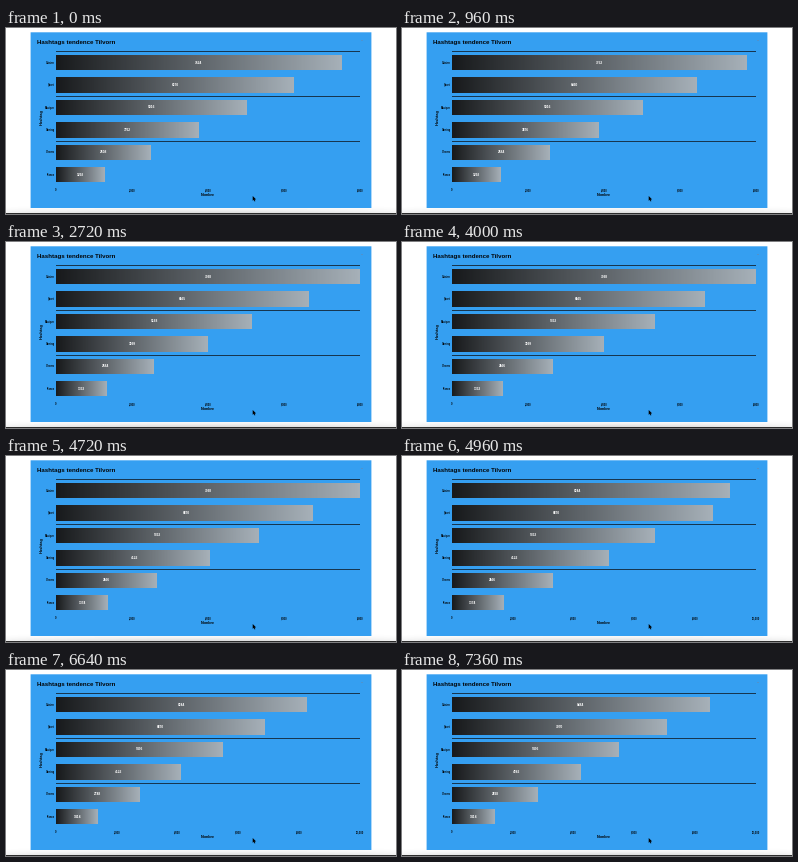
Write a matplotlib script that moves like this. It is 390 by 186 pixels and loops after 8000 ms.

```python
import numpy as np
import matplotlib.pyplot as plt
from matplotlib.animation import FuncAnimation
from matplotlib.colors import LinearSegmentedColormap
from matplotlib.patches import Polygon, Rectangle

W, H, DPI = 390, 186, 100
STEP, FRAMES = 80, 100
LEFT, SPAN = 50, 304
TOP, PITCH, BAR_H = 23.5, 22.4, 15.5
BLUE, INK = "#359ff1", "#020508"
RESCALE = 62

TAGS = ["Cuisine", "Sport", "Musique", "Gaming", "Cinema", "France"]
WEIGHTS = [6, 5, 4, 3, 2, 1]
COUNTS = [1254, 1292, 1333, 1374, 1414]

# Frames at which each count is raised, and at which its bar follows.
RAISE = [(3, 32, 62, 90), (1, 31, 59, 87), (16, 46, 75),
         (1, 31, 59, 87), (5, 35, 64, 91), (25, 54, 83)]
GROW = list(RAISE)
GROW[1] = (5, 31, 59, 89)
GROW[3] = (3, 31, 59, 89)
FIRST = [0, 0, 0, 0, 0, 1]

fig = plt.figure(figsize=(W / DPI, H / DPI), dpi=DPI, facecolor="white")
ax = fig.add_axes([0, 0, 1, 1])
ax.axis("off")


def px(size):
    return size * 72 / DPI


def write(x, y, text, size, color=INK, ha="center", bold=True, **kw):
    return ax.text(x, y, text, fontsize=px(size), color=color, ha=ha,
                   va="center", family="Liberation Sans",
                   weight="bold" if bold else "normal", zorder=5, **kw)


def box(x, y, w, h, color, snap=True):
    ax.add_patch(Rectangle((x, y), w, h, fc=color, ec="none", snap=snap))


def middle(row):
    return TOP + (row + 0.5) * PITCH


def value(schedule, bar, frame):
    done = sum(frame >= f for f in schedule[bar])
    return WEIGHTS[bar] * COUNTS[FIRST[bar] + done]


def axis_max(frame):
    return 10000 if frame >= RESCALE else 8000


def bar_end(bar, frame):
    shown = (value(GROW, bar, frame) + value(GROW, bar, frame - 1)) / 2
    now, before = SPAN / axis_max(frame), SPAN / axis_max(frame - 1)
    # The leading bar is halfway through the new scale while the rest wait.
    scale = (now + before) / 2 if bar == 0 else before
    return round(LEFT + shown * scale)


# Page shadow, window edge and panel
across = np.sin(np.linspace(0.15, np.pi - 0.15, W)) ** 0.5
down = np.linspace(0, 1, 9)[:, None] ** 2
ax.imshow(1 - 0.13 * down * across, cmap="gray", vmin=0, vmax=1,
          extent=(0, W, 185, 176), aspect="auto", zorder=0)
box(0, 185, W, 1, "#2c2c2c")
box(24.6, 4.3, 340.8, 175.7, BLUE, snap=False)

write(31, 14.4, "Hashtags tendence Tilvorn", 6.13, ha="left")
write(35.7, 89, "Hashtag", 4, rotation=90)
write(201.5, 167, "Nombre", 3.8)
box(355, 12, 2, 1, "#4e93cf")

for row in (0, 2, 4):
    box(LEFT, int(TOP + row * PITCH), SPAN, 1, "#17364f")

# Bars
shade = LinearSegmentedColormap.from_list("shade", ["#181a1c", "#a6b0b8"])
ramp = np.linspace(0, 1, 256)[None, :]
bars, labels = [], []
for i, tag in enumerate(TAGS):
    write(49, middle(i), tag, 2.5, ha="right")
    bars.append(ax.imshow(ramp, cmap=shade, aspect="auto", zorder=3,
                          interpolation="bilinear"))
    labels.append(write(0, middle(i), "", 3.2, color="white"))

ticks = [write(0, 162, "", 2.5) for _ in range(6)]

# Pointer
cursor = np.array([(0, 0), (0, 4.4), (1, 3.5), (1.7, 5), (2.4, 4.7),
                   (1.8, 3.2), (3.1, 3.1)]) * 1.1 + (246.7, 168)
ax.add_patch(Polygon(cursor, fc="black", ec="none", zorder=6))

ax.set_xlim(0, W)
ax.set_ylim(H, 0)


def draw(frame):
    top = axis_max(frame)
    for i, (bar, label) in enumerate(zip(bars, labels)):
        bar.set_extent((LEFT, bar_end(i, frame),
                        round(middle(i) + BAR_H / 2),
                        round(middle(i) - BAR_H / 2)))
        count = value(RAISE, i, frame)
        label.set_text(str(count))
        label.set_x(LEFT + count * SPAN / top / 2)
    for i, tick in enumerate(ticks):
        number = i * 2000
        tick.set_text(f"{number:,}" if number <= top else "")
        tick.set_x(LEFT + SPAN * number / top if number <= top else LEFT)
    return bars + labels + ticks


anim = FuncAnimation(fig, draw, frames=FRAMES, interval=STEP,
                     init_func=lambda: draw(0), repeat=True, repeat_delay=0)
plt.show()
```
